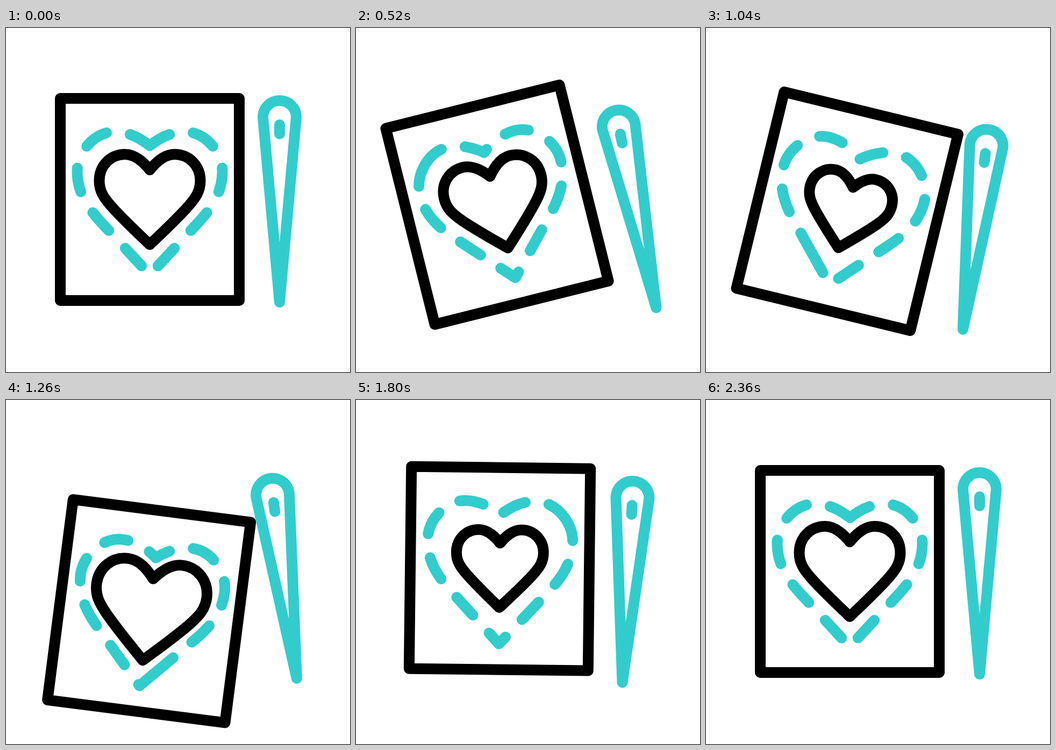
Animation, 640 px wide and 640 px high, one loop 2.4 s. Source, as an HTML page:

```html
<!DOCTYPE html>
<html lang="en">
<head>
<meta charset="utf-8">
<title>Stitched heart</title>
<style>
  html, body { margin: 0; width: 100%; height: 100%; overflow: hidden; background: #fff; }
  svg { display: block; width: 100%; height: 100%; }
  path, rect { fill: none; stroke-width: 20; stroke-linecap: round; stroke-linejoin: round; vector-effect: non-scaling-stroke; }
  .ink { stroke: #000; }
  .thread { stroke: #33cccc; }
</style>
</head>
<body>
<svg viewBox="0 0 640 640">
  <g id="card">
    <rect class="ink" x="101" y="131" width="333" height="376"/>
    <g transform="translate(267.5 319)">
      <path id="stitches" class="thread" pathLength="1000" d="M0-100C-20-116-42-126-66-126C-101-126-135-90-135-52C-135-10-112 19-91 42L0 140L91 42C112 19 135-10 135-52C135-90 101-126 66-126C42-126 20-116 0-100Z"/>
      <path id="heart" class="ink" d="M0-55C-12-70-27-84-46-84C-73-84-94-63-94-35C-94-15-85-3-73 11C-53 34-24 61 0 84C24 61 53 34 73 11C85-3 94-15 94-35C94-63 73-84 46-84C27-84 12-70 0-55Z"/>
    </g>
  </g>
  <g id="needle" class="thread">
    <path d="M509 510L478 166A31 31 0 1 1 540 166Z"/>
    <path d="M509 180V197"/>
  </g>
</svg>
<script>
const LOOP = 2400, END = 2360, CARD_DELAY = 220;
const [card, stitches, heart, needle] =
  ['card', 'stitches', 'heart', 'needle'].map(id => document.getElementById(id));

// Ease in and out; weight is the length of both bezier handles.
function ease(x, weight) {
  let lo = 0, hi = 1, s = 0.5;
  for (let i = 0; i < 24; i++) {
    s = (lo + hi) / 2;
    const r = 1 - s;
    const at = 3 * weight * s * r * r + 3 * (1 - weight) * s * s * r + s ** 3;
    if (at < x) lo = s; else hi = s;
  }
  return s * s * (3 - 2 * s);
}

function track(keys, weight) {
  return t => {
    if (t <= keys[0][0]) return keys[0][1];
    for (let i = 1; i < keys.length; i++) {
      const [t0, a] = keys[i - 1], [t1, b] = keys[i];
      if (t < t1) return a + (b - a) * ease((t - t0) / (t1 - t0), weight);
    }
    return keys[keys.length - 1][1];
  };
}

const tilt = track([[0, 0], [412, -18.2], [878, 16.3], [1310, -9.2], [1692, 4], [2120, 0]], 1 / 6);
const lift = track([[0, 0], [360, 54], [718, -36.5], [1066, 54], [1425, -24], [1775, 16], [2140, 0]], 1 / 3);
const beat = track([[0, 1], [325, 0.776], [650, 1.1], [960, 0.78], [1280, 1.102], [1690, 0.776], [2020, 1.1], [END, 1]], 1 / 3);
const travel = track([[0, 0], [END, 1]], 0.26);

const LONG = 100, SHORT = (1000 - LONG) / 17;
stitches.setAttribute('stroke-dasharray', [LONG, ...Array(17).fill(SHORT)].join(' '));

function swing(part, t, px, py) {
  part.setAttribute('transform', `translate(0 ${lift(t)}) rotate(${tilt(t)} ${px} ${py})`);
}

function draw(now) {
  const t = now % LOOP;
  swing(needle, t, 509, 265);
  swing(card, t - CARD_DELAY, 101, 319);
  heart.setAttribute('transform', `scale(${beat(t)})`);
  stitches.setAttribute('stroke-dashoffset', LONG / 2 - 1000 * travel(t));
}

const start = performance.now();
function tick() {
  draw(performance.now() - start);
  requestAnimationFrame(tick);
}
tick();
</script>
</body>
</html>
```
